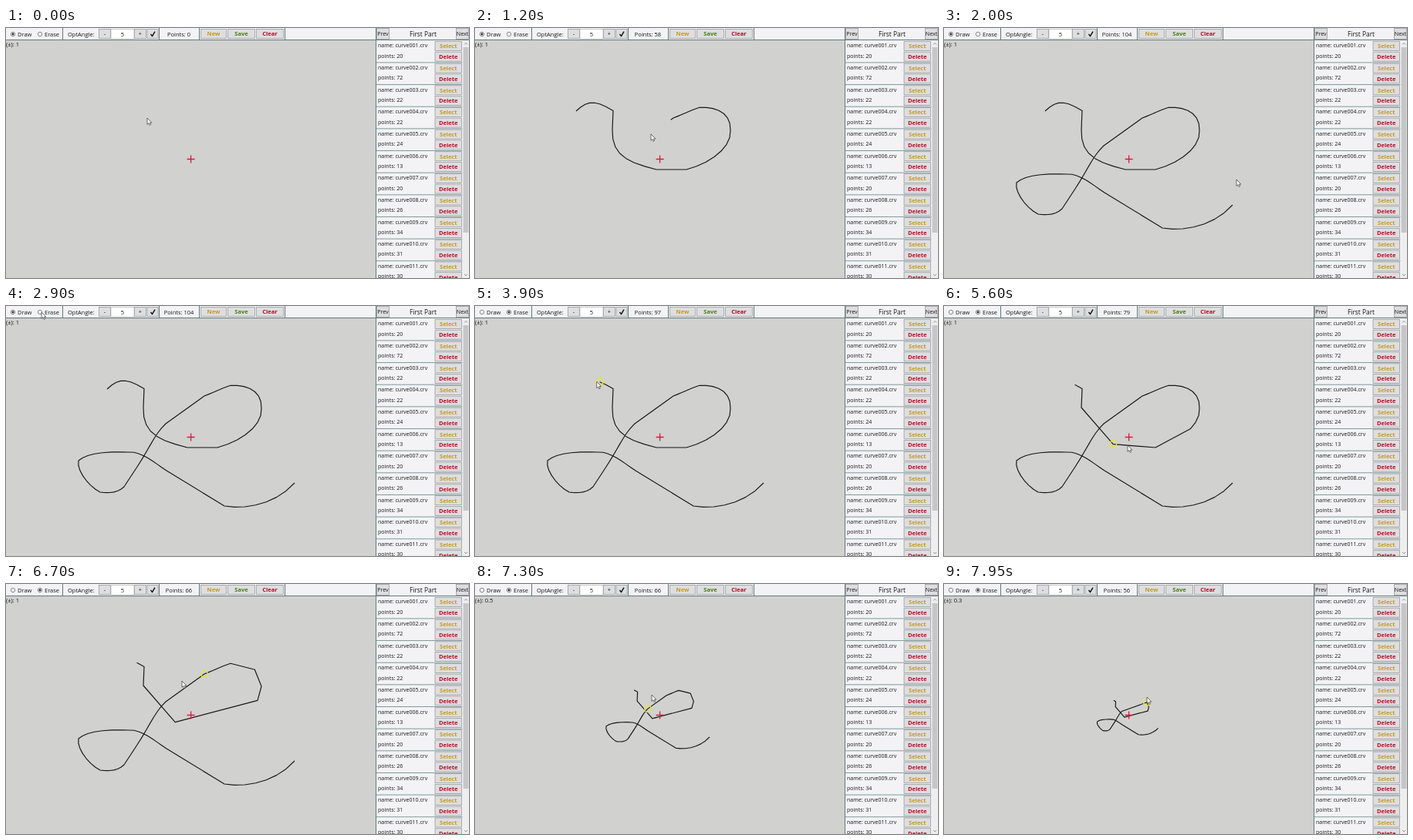
Recreate the animation shown at these times as an HTML page. Size 600 by 325 pixels, loop 8 s.

```html
<!DOCTYPE html>
<html lang="en">
<head>
<meta charset="utf-8">
<title>Curve editor</title>
<style>
  html, body { margin: 0; width: 100%; height: 100%; overflow: hidden; background: #d1d1cf; }
  svg { display: block; width: 600px; height: 325px; }
  text { font: 7.5px "Open Sans", "Noto Sans", sans-serif; fill: #161616; }
  .b { font-weight: 700; }
  .s { font-size: 7.05px; }
  .m { text-anchor: middle; }
  .title { font-size: 8.4px; }
</style>
</head>
<body>
<svg id="stage" viewBox="0 0 600 325"></svg>
<script>
const LOOP = 8000, STEP = 50;
const CENTER = { x: 239.6, y: 170.5 };
const GOLD = '#c39a22', GREEN = '#4a7d18', RED = '#b00d26', INK = '#161616', EDGE = '#62797b';
const stage = document.getElementById('stage');

function add(tag, attrs, text) {
  const el = document.createElementNS('http://www.w3.org/2000/svg', tag);
  for (const key in attrs) el.setAttribute(key, attrs[key]);
  if (text !== undefined) el.textContent = text;
  stage.appendChild(el);
  return el;
}
const box = (x, y, width, height, fill, more) => add('rect', { x, y, width, height, fill, ...more });
const label = (x, y, text, cls = '', fill = INK) =>
  add('text', { x, y, class: cls, style: `fill:${fill}` }, text);
const line = (d, stroke, width = 1) =>
  add('path', { d, stroke, 'stroke-width': width, fill: 'none', 'stroke-linejoin': 'round' });

function button(x, y, w, h, text, color = INK, cls = 'm') {
  box(x + .5, y + .5, w - 1, h - 1, '#dedee0', { stroke: '#999c9e', 'stroke-width': .8 });
  label(x + w / 2, y + h / 2 + 2.8, text, cls, color);
}

// The stroke: smooth bends become DIV points each, straight pieces only their ends
const DIV = 7;
const SHAPE = `M131 108C146 94 155 93 179 107.5L178 132C177 164 195 174 235 184L274 184
  C305 176 333 155 331 133C332 110 312 102 291 103.3C279 107 270 112 257 117L207 153
  C193 166 187 183 170 209L153 235C144 244 131 243 122 242C108 235 91 214 94 201
  C104 192 128 188 166 190.3C180 193 193 204 208 214L283 260C312 265 350 257 374 230`;

function sample(shape) {
  const out = [];
  shape.match(/[MCL][^MCL]+/g).forEach((part, seg) => {
    const n = part.slice(1).trim().split(/\s+/).map(Number);
    const p = out[out.length - 1];
    if (!p) return out.push({ x: n[0], y: n[1], s: 0, d: 0 });
    const parts = part[0] === 'C' ? DIV : 1;
    for (let j = 1; j <= parts; j++) {
      const u = j / parts, v = 1 - u;
      const at = (a, c) => parts === 1 ? n[c] :
        v * v * v * a + 3 * u * v * v * n[c] + 3 * u * u * v * n[c + 2] + u * u * u * n[c + 4];
      const x = at(p.x, 0), y = at(p.y, 1), last = out[out.length - 1];
      out.push({ x, y, s: (seg - 1 + u) * DIV, d: last.d + Math.hypot(x - last.x, y - last.y) });
    }
  });
  out.forEach(p => p.s = Math.round(p.s));
  return out;
}
const curve = sample(SHAPE);
const end = curve[curve.length - 1];

// Point where the running value `key` (distance d or index s) reaches `value`
function pointAt(key, value) {
  const i = Math.max(1, curve.findIndex(p => p[key] >= value));
  return mix(curve[i - 1], curve[i], (value - curve[i - 1][key]) / (curve[i][key] - curve[i - 1][key]));
}
function mix(a, b, u) {
  u = Math.max(0, Math.min(1, u));
  return { x: a.x + (b.x - a.x) * u, y: a.y + (b.y - a.y) * u };
}
function track(keys, t) {
  const i = keys.findIndex(k => k.t >= t);
  if (i < 0) return keys[keys.length - 1];
  return i ? mix(keys[i - 1], keys[i], (t - keys[i - 1].t) / (keys[i].t - keys[i - 1].t)) : keys[0];
}

// Drawing: x is the length drawn, y the number of points; the pointer runs ahead
const PEN_START = 300, PEN_END = 1930, LEAD = 42, ERASE_AT = 2950;
const pen = [
  { t: PEN_START, x: 0, y: 0 },
  { t: 1200, x: curve.find(p => p.s === 7 * DIV).d + 4, y: 58 },
  { t: PEN_END, x: end.d, y: 104 }
];

// Erasing: each sweep runs along the curve and spares a few points
const sweeps = [
  { t0: 3450, t1: 4000, from: -1, to: 6, keep: [], left: 95 },
  { t0: 4350, t1: 5100, from: 14, to: 32, keep: [20, 28], left: 79 },
  { t0: 5700, t1: 6550, from: 20, to: 42, keep: [33, 35, 38], left: 66 },
  { t0: 7700, t1: 7900, from: 56, to: 38, keep: [], left: 56 }
];
const edgeOf = (w, t) => w.from + (w.to - w.from) * Math.min(1, (t - w.t0) / (w.t1 - w.t0));

function zoomAt(t) {
  return Math.pow(.9, Math.max(0, Math.min(12, Math.floor((t - 6900) / 57))));
}
const zoomed = (p, t) => mix(CENTER, p, zoomAt(t));
const sweepPoint = (w, t) => zoomed(pointAt('s', Math.max(0, edgeOf(w, t))), t);

const stops = [
  { t: 0, x: 183, y: 117 }, { t: PEN_START - LEAD, ...curve[0] },
  { t: PEN_END - LEAD, x: end.x, y: end.y }, { t: 2000, x: 379, y: 197 },
  { t: 2900, x: 46, y: 8 }, { t: 3050, x: 46, y: 8 },
  { t: 5600, x: 238, y: 181 }, { t: 6700, x: 228, y: 126 }, { t: 7000, x: 228, y: 128 },
  { t: 7950, x: 263, y: 147 },
  ...sweeps.flatMap(w => [w.t0, w.t1].map(t => ({ t, ...sweepPoint(w, t) })))
].sort((a, b) => a.t - b.t);

function mouseAt(t) {
  if (t >= PEN_START - LEAD && t < PEN_END - LEAD) return pointAt('d', track(pen, t + LEAD).x);
  const sweep = sweeps.find(w => t > w.t0 && t < w.t1);
  if (!sweep) return track(stops, t);
  const p = sweepPoint(sweep, t);
  return sweep === sweeps[0] ? { x: p.x - 2, y: p.y } : p;
}

function visible(t) {
  if (t <= PEN_START) return [];
  if (t < PEN_END) {
    const d = track(pen, t).x;
    return [...curve.filter(p => p.d < d), pointAt('d', d)];
  }
  const gone = p => sweeps.some(w => {
    const edge = edgeOf(w, t);
    return t > w.t0 && (p.s - w.from) * (p.s - edge) < 0 && !w.keep.includes(p.s);
  });
  return curve.filter(p => !gone(p));
}

const counts = [...pen];
for (const w of sweeps) {
  counts.push({ t: w.t0, x: 0, y: counts[counts.length - 1].y }, { t: w.t1, x: 0, y: w.left });
}

// Drawing area
box(0, 0, 600, 325, '#d1d1cf');
const scaleText = label(0, 24.3, '');
const path = line('', '#151515', 1.15);
const ring = add('circle', { r: 4.3, fill: 'none', stroke: '#e6e632', 'stroke-width': 1.5 });
line(`M${CENTER.x - 5} ${CENTER.y}h10m-5 -5v10`, '#e3153d', 1.3);

// Toolbar
box(0, 0, 480, 15, '#f3f3f5');
line('M0 15.5H480M73.5 0V15M198.5 0V15M250.5 0V15M361.5 0V15', EDGE);
const dots = [['Draw', 9], ['Erase', 44]].map(([name, x]) => {
  add('circle', { cx: x, cy: 8, r: 2.7, fill: '#fff', stroke: '#555', 'stroke-width': .7 });
  label(x + 6, 10.7, name);
  return add('circle', { cx: x, cy: 8, r: 1.4, fill: '#222' });
});
label(80, 10.7, 'OptAngle:');
box(136, 1.5, 30, 12.5, '#fff', { stroke: '#aaa', 'stroke-width': .6 });
label(151, 10.7, '5', 'm');
button(120, 1, 16, 13, '-');
button(166, 1, 16, 13, '+');
button(182.5, 1, 15, 13, '');
line('M187.5 8l2 2.6L193 4.6', INK, 1.5);
const countText = label(224, 10.7, '', 'm');
button(252, 1, 34, 13, 'New', GOLD, 'm b');
button(287, 1, 36, 13, 'Save', GREEN, 'm b');
button(324, 1, 36, 13, 'Clear', RED, 'm b');

// Side list
box(480, 0, 120, 325, '#f3f3f5');
[20, 72, 22, 22, 24, 13, 20, 26, 34, 31, 30].forEach((n, i) => {
  const y = 16 + i * 28.65;
  label(482, y + 9.3, `name: curve${String(i + 1).padStart(3, '0')}.crv`, 's');
  label(482, y + 22.6, `points: ${n}`, 's');
  button(555.5, y + 1, 35.5, 13, 'Select', GOLD, 'm b');
  button(555.5, y + 14.7, 35.5, 13, 'Delete', RED, 'm b');
  line(`M480 ${y + 28.9}H591.5`, '#83979a');
});
box(592, 16, 8, 309, '#eeeeef');
box(592.5, 25, 7, 241, '#c6c6c8');
line('M594 21.5l2 -2l2 2M594 320l2 2l2 -2', '#8a8a8a', .9);
box(480, 0, 120, 15, '#f3f3f5');
button(480, 0, 17, 15, 'Prev', INK, 'm s');
button(583, 0, 17, 15, 'Next', INK, 'm s');
label(540.5, 10.8, 'First Part', 'm title');
line('M479.5 0V325M480 15.5H600', EDGE);

const cursor = add('path', {
  d: 'M0 0V8.3L1.9 6.6L3.2 9.4L4.6 8.8L3.4 6.1H5.8Z',
  fill: '#fff', stroke: '#333', 'stroke-width': .7, 'stroke-linejoin': 'round'
});

function draw(t) {
  const pts = visible(t).map(p => zoomed(p, t));
  path.setAttribute('d', pts.map((p, i) => `${i ? 'L' : 'M'}${p.x.toFixed(2)} ${p.y.toFixed(2)}`).join(''));

  const mouse = mouseAt(t), erasing = t >= ERASE_AT;
  cursor.setAttribute('transform', `translate(${mouse.x} ${mouse.y})`);
  if (erasing) {
    const far = p => Math.hypot(p.x - mouse.x, p.y - mouse.y);
    const near = pts.reduce((a, b) => far(b) < far(a) ? b : a);
    ring.setAttribute('cx', near.x);
    ring.setAttribute('cy', near.y);
  }
  ring.style.display = dots[1].style.display = erasing ? '' : 'none';
  dots[0].style.display = erasing ? 'none' : '';
  scaleText.textContent = `(±): ${Math.round(zoomAt(t) * 10) / 10}`;
  countText.textContent = `Points: ${Math.round(track(counts, t).y)}`;
}

const begin = performance.now();
function tick() {
  const t = (performance.now() - begin) % LOOP;
  draw(Math.floor(t / STEP) * STEP);
  requestAnimationFrame(tick);
}
tick();
</script>
</body>
</html>
```
